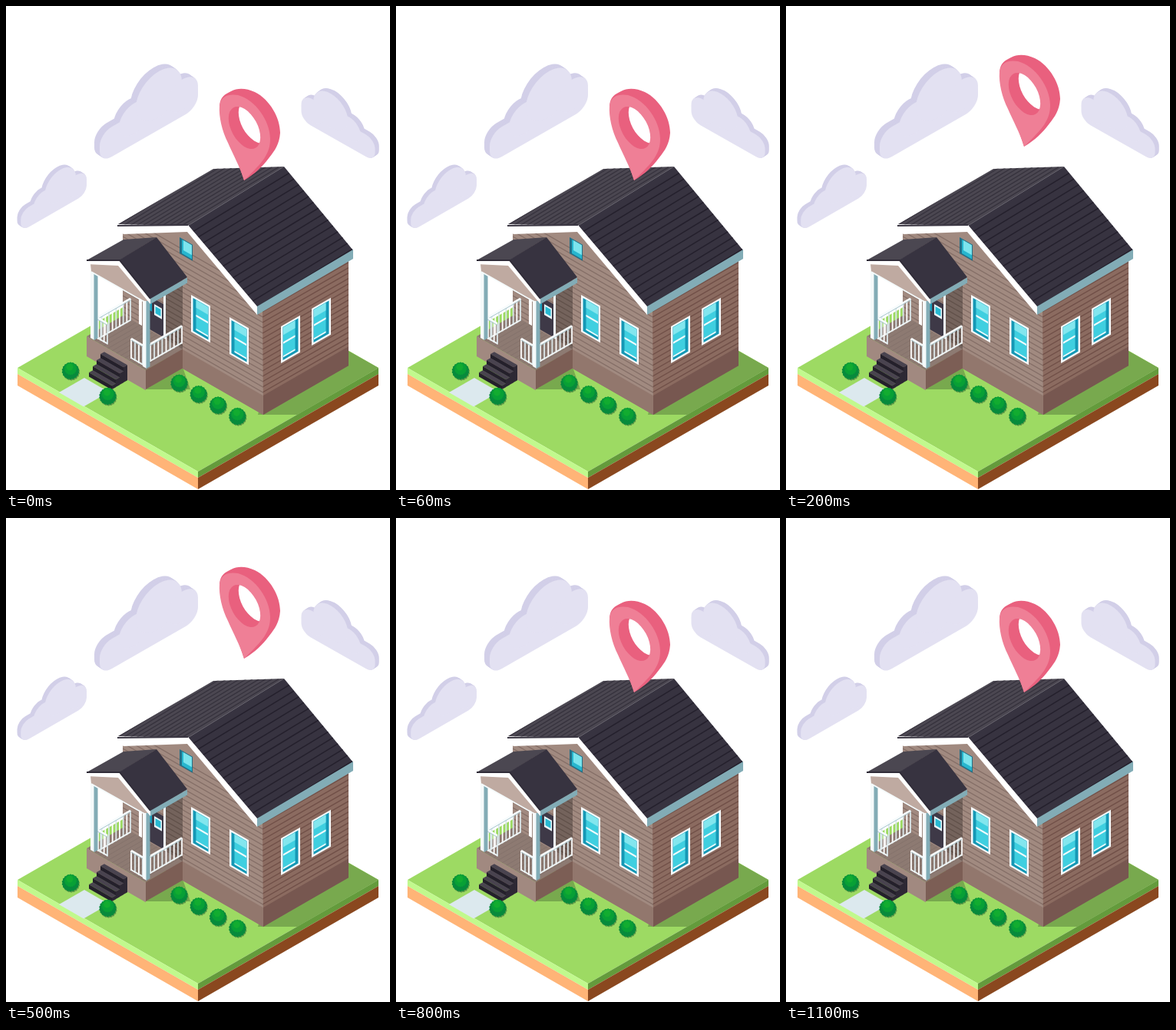
An HTML page with a canvas for the animation above (1300 ms loop, 500 by 630 pixels).

```html
<!DOCTYPE html>
<html lang="en">
<head>
<meta charset="utf-8">
<title>House with map pin</title>
<style>
html, body { margin: 0; width: 100%; height: 100%; overflow: hidden; background: #fff; }
canvas { display: block; }
</style>
</head>
<body>
<canvas id="stage" width="500" height="630"></canvas>
<script>
const ctx = document.getElementById('stage').getContext('2d');
const K = 0.5745; // slope of the isometric axes

// Isometric paths: a wall running down-right (s = K) or up-right (s = -K), and a floor.
const wall = (x, y, w, h, s) => `M${x} ${y}l${w} ${w * s}v${h}l${-w} ${-w * s}Z`;
const tile = (x, y, a, b) => `M${x} ${y}l${a} ${a * K} ${b} ${-b * K} ${-a} ${-a * K}Z`;

function fill(color, d) {
  ctx.fillStyle = color;
  ctx.fill(new Path2D(d));
}

function line(color, width, d) {
  ctx.strokeStyle = color;
  ctx.lineWidth = width;
  ctx.stroke(new Path2D(d));
}

function within(matrix, draw) {
  ctx.save();
  ctx.transform(...matrix);
  draw();
  ctx.restore();
}

// Fills a face and rules it with n parallel lines (dx, dy) spaced by (sx, sy).
function boards(color, d, ink, [x, y], [dx, dy], [sx, sy], n, width = 1.3) {
  fill(color, d);
  ctx.save();
  ctx.clip(new Path2D(d));
  for (let i = 1; i <= n; i++) {
    line(ink, width, `M${x + sx * i} ${y + sy * i}l${dx} ${dy}`);
  }
  ctx.restore();
}

// Round lobes on a flat base in an isometric plane, extruded towards the back.
function cloud(matrix) {
  within(matrix, () => {
    for (let d = 7; d >= 0; d--) {
      within([1, -K, 0, 1, 126 - d, 203 - d * 0.7], () => {
        ctx.fillStyle = d ? '#d2cfe8' : '#e3e1f2';
        ctx.beginPath();
        ctx.roundRect(-4, -39, 128, 39, 16);
        ctx.fill();
        for (const [x, y, r] of [[41, -33, 20], [73, -46, 30], [104, -28, 20]]) {
          ctx.beginPath();
          ctx.arc(x, y, r, 0, 7);
          ctx.fill();
        }
      });
    }
  });
}

function bush(x, y) {
  const ball = (cx, cy, r, color) => {
    ctx.beginPath();
    for (let i = 0; i < 36; i++) {
      const a = i * Math.PI / 18, q = r + (i % 2 ? 0.5 : -0.5);
      ctx.lineTo(cx + q * Math.cos(a), cy + q * Math.sin(a));
    }
    ctx.fillStyle = color;
    ctx.fill();
  };
  ball(x + 1, y + 1.5, 10.8, '#5f9a48');
  ball(x, y, 11, '#078a3c');
  ball(x, y - 3, 8, '#08a035');
  ball(x - 1, y - 5, 4.5, '#12ac30');
}

function sash(x, y, slope) {
  within([1, slope, 0, 1, x, y], () => {
    const box = (c, a, b, w, h) => { ctx.fillStyle = c; ctx.fillRect(a, b, w, h); };
    const left = slope > 0 ? 6.5 : 3;
    box('#f7fbfc', 0, 0, 25, 48);
    box('#1598b5', 2.5, 2.5, 20, 43);
    box('#3fcfe0', left, 3, 15.5, 39);
    box('#83e6ee', left, 3, 15.5, 10);
    box('#effafb', left, 22, 15.5, 2.5);
    box('#effafb', left, 40, 15.5, 2);
  });
}

function ground() {
  fill('#9dda63', tile(15, 471, 235, 235));
  fill('#78a94e', 'M446 449 485 471 379 532H328L335 505ZM182 499H240L230 470Z');
  fill('#c1f98d', wall(15, 471, 235, 8, K));
  fill('#649b3c', wall(250, 606, 235, 8, -K));
  fill('#ffb477', wall(15, 479, 235, 15, K));
  fill('#8a481f', wall(250, 614, 235, 15, -K));
  fill('#dce9ee', tile(69, 503, 32, 33));
}

function house() {
  boards('#a18a80', 'M152 296 237 293 335 400V532L152 427Z', '#846e66',
    [152, 265], [185, 185 * K], [0, 7], 38);
  boards('#8b6b60', 'M334 396 446 328V467L335 532Z', '#704f47',
    [334, 391], [112, -112 * K], [0, 7], 18);
  fill('#92776d', wall(230, 447, 105, 25, K));
  fill('#775750', wall(335, 507, 111, 25, -K));
  for (const i of [0, 1]) {
    sash(241 + i * 50, 376 + i * 29, K);
    sash(358 + i * 40, 417 - i * 23, -K);
  }
  fill('#236f87', wall(226, 301, 17, 21, K));
  fill('#27b6ce', wall(229, 304, 13, 18, K));
  fill('#7ce4ed', wall(231, 305, 11, 13, K));

  boards('#4b4751', 'M146 284 270 212 362 209 237 286Z', '#36323d',
    [237, 286], [126, -76], [-8.3, -0.1], 11);
  boards('#373340', 'M237 286 362 209 452 318 327 392Z', '#24202c',
    [237, 286], [125, -76], [6.43, 7.57], 14, 1.5);
  fill('#fff', 'M145 285 237 285 327 391V402L236 294 153 297 145 290Z');
  line('#3b3743', 2, 'M145 286 237 285');
  fill('#82acb6', 'M327 391 452 317V329L327 402Z');
}

function rail(x, y, dx, h, s, n) {
  for (let i = 0; i <= n; i++) {
    line(i % 2 ? '#dbe7ea' : '#fff', 1.8, `M${x + dx * i / n} ${y + dx * s * i / n}v${h}`);
  }
  const bar = (color, width, at) => line(color, width, `M${x} ${y + at}l${dx} ${dx * s}`);
  bar('#f7fbfc', 2.6, 0);
  bar('#a8c6cd', 1, 2);
  bar('#eef5f6', 2, h - 1);
}

function post(x, y, h) {
  fill('#f5fafb', wall(x, y, 5, h, K));
  fill('#82acb6', wall(x + 4.5, y + 3, 5, h, -K));
}

// Four steps, each lower and nearer than the last.
function stairs() {
  for (let i = 0; i < 4; i++) {
    const x = 123 - i * 5, y = 453 + i * 8;
    fill('#2d2834', wall(x + 30, y + 17, 5, 20 - i * 5, -K));
    fill('#49434f', tile(x, y, 30, 5));
    fill('#24202b', wall(x, y, 30, 5.5, K));
  }
}

function porch() {
  // Back wall and door
  boards('#74635c', 'M207 350H230V447L207 434Z', '#605049',
    [207, 345], [24, 24 * K], [0, 7], 14);
  fill('#3e3947', wall(177, 372, 30, 43, K));
  fill('#9c877e', wall(177, 374, 9, 41, K));
  fill('#fff', wall(173, 372, 4, 42, K));
  fill('#eef6f7', wall(205, 374, 3, 58, K));
  fill('#199dba', wall(185, 381, 5, 14, K));
  fill('#e9f6f8', wall(193, 388, 10, 14, K));
  fill('#28b9d1', wall(194.5, 391, 7, 9, K));

  // Deck
  boards('#8d7a72', tile(105, 430, 77, 48), '#82706a',
    [105, 430], [48, -48 * K], [5.5, 5.5 * K], 13, 0.8);
  rail(120, 405, 42, 29, -K, 9);
  fill('#a18980', wall(105, 430, 77, 26, K));
  fill('#7c5e55', wall(182, 474, 48, 25, -K));
  stairs();
  rail(119, 406, 13, 27, K, 3);
  rail(163, 433, 15, 26, K, 3);
  rail(188, 440, 41, 23, -K, 8);
  post(110, 345, 87);
  post(178, 376, 93);

  // Gable and roof
  fill('#bfaaa1', 'M110 336 148 336 187 384 180 384 111 346Z');
  line('#f5fafb', 2, 'M111 346 180 385');
  fill('#4b4751', 'M105 331 153 304 196 301 148 331Z');
  fill('#373340', 'M147 331 196 301 236 353 188 382Z');
  fill('#fff', 'M105 332 148 331 188 381V388L146 338 105 336Z');
  line('#302c38', 2, 'M105 331 148 331 188 381');
  fill('#82acb6', wall(188, 381, 48, 7, -K));
}

function pin(y) {
  within([1, 0, 0, 1, 0, y], () => {
    fill('#e9607e', `M278 130C279 118 285 115 293 111C302 106 313 107 324 112
      C344 122 357 146 357 165C356 180 350 188 343 197C333 210 325 218 310 227Z`);
    fill('#ef7f96', `M310 227C304 208 296 194 289 178C281 162 277 144 278 130
      C280 117 290 114 302 116C325 122 344 150 344 173C344 192 335 203 310 227Z`);
    const hole = (x, cy) => {
      ctx.beginPath();
      ctx.ellipse(x, cy, 17, 30, -0.5, 0, 7);
    };
    hole(310.5, 158.5);
    ctx.fillStyle = '#e9607e';
    ctx.fill();
    ctx.clip();
    hole(323.5, 151);
    ctx.fillStyle = '#fff';
    ctx.fill();
  });
}

function lift(t) {
  if (t < 100 || t >= 800) return 0;
  return t < 200 || t >= 700 ? -19 : -44;
}

function draw(y) {
  ctx.fillStyle = '#fff';
  ctx.fillRect(0, 0, 500, 630);
  cloud([1, 0, 0, 1, 0, 0]);
  cloud([0.67, 0, 0, 0.67, -62.5, 156]);
  cloud([-0.75, 0, 0, 0.74, 572, 51]);
  ground();
  house();
  porch();
  bush(84, 475);
  bush(132.5, 508);
  for (let i = 0; i < 4; i++) bush(225.5 + i * 25.3, 491 + i * 14.4);
  pin(y);
}

let shown;
function tick() {
  const y = lift(performance.now() % 1300);
  if (y !== shown) draw(shown = y);
  requestAnimationFrame(tick);
}
tick();
</script>
</body>
</html>
```
